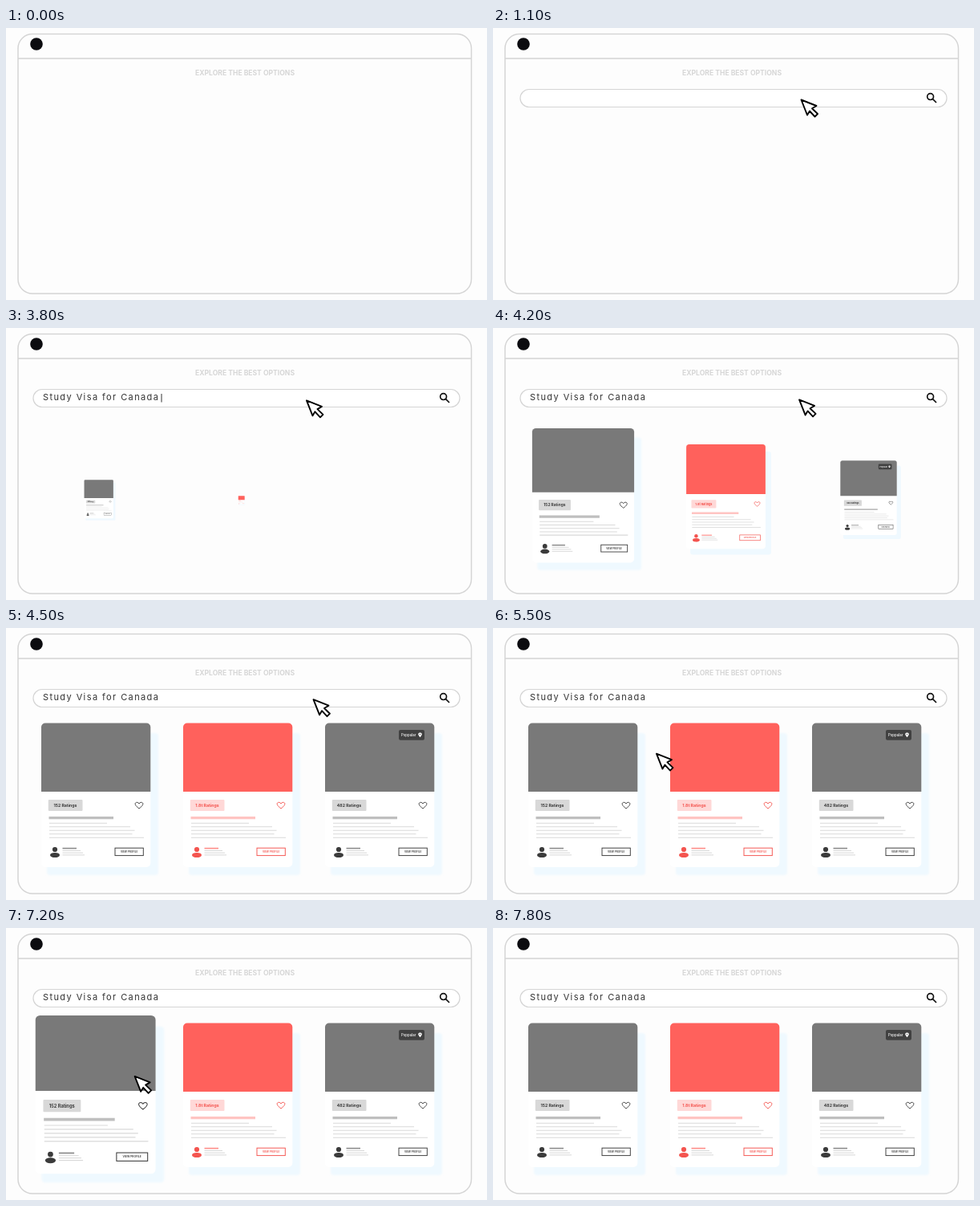
Recreate the animation shown at these times as an HTML page. Size 600 by 339 pixels, loop 9000 ms.

```html
<!DOCTYPE html>
<html lang="en">
<head>
<meta charset="utf-8">
<title>Study visa search</title>
<style>
  html, body { margin: 0; width: 100%; height: 100%; overflow: hidden; background: #fdfdfd; }
  svg { display: block; width: 100%; height: 100%; }
  text { font-family: Inter, "Open Sans", sans-serif; }
</style>
</head>
<body>
<svg viewBox="0 0 600 339">
  <defs>
    <filter id="soft" x="-10%" y="-10%" width="120%" height="120%">
      <feGaussianBlur stdDeviation="1"/>
    </filter>
  </defs>
  <rect width="600" height="339" fill="#fdfdfd"/>
  <g fill="none" stroke="#d5d5d5" stroke-width="1.5">
    <rect x="15" y="7.5" width="565.5" height="323.5" rx="18"/>
    <path d="M15 38H580.5"/>
  </g>
  <circle cx="38" cy="20" r="7.8" fill="#0b0b0f"/>
  <text x="298" y="58.6" text-anchor="middle" font-size="8.6" font-weight="700" fill="#d6d6d6">EXPLORE THE BEST OPTIONS</text>

  <g id="bar">
    <rect x="34" y="76.5" width="532" height="22" rx="11" fill="#fff" stroke="#d5d5d5" stroke-width="1.2"/>
    <g fill="none" stroke="#111" stroke-width="1.7">
      <circle cx="545.6" cy="85.6" r="3.9"/>
      <path d="M548.4 88.4L553 93"/>
    </g>
  </g>
  <text id="query" x="46" y="90.4" font-size="11" letter-spacing="1.4" fill="#333"></text>
  <path id="caret" d="M194 82V92.5" stroke="#333"/>

  <g id="cards"></g>
  <path id="cursor" d="M0 0L19 7.5L13.5 10.8L20.5 17.5L17 21L10.5 14L7.5 19Z"
        fill="#fff" stroke="#000" stroke-width="1.9" stroke-linejoin="round"/>
</svg>

<script>
const LOOP = 9000, STEP = 100;
const QUERY = "Study Visa for Canada";
const CENTER = { x: 117, y: 215 }, CARD_GAP = 177;
const GRAY = { top: "#797979", badge: "#d8d8d8", bar: "#bfbfbf", ink: "#3b3b3b", name: "#8c8c8c" };
const RED = { top: "#ff615c", badge: "#ffd8d7", bar: "#ffc4c2", ink: "#f4544f", name: "#ff8d89" };
const CARDS = [
  { ratings: "152 Ratings", colors: GRAY },
  { ratings: "1.8t Ratings", colors: RED },
  { ratings: "482 Ratings", colors: GRAY, popular: true }
];

const $ = id => document.getElementById(id);
const clamp = v => Math.min(1, Math.max(0, v));
const progress = (t, from, to) => clamp((t - from) / (to - from));
const ease = u => (1 - Math.cos(Math.PI * u)) / 2;
const mix = (a, b, u) => a + (b - a) * u;
const rule = (x1, x2, y, color, width) =>
  `<path d="M${x1} ${y}H${x2}" stroke="${color}" stroke-width="${width}"/>`;

const popularTag = `
  <rect x="136" y="127" width="32" height="12.8" rx="2" fill="#414141"/>
  <text x="139" y="135" font-size="4.3" font-weight="500" fill="#fff">Poppular</text>
  <path d="M162.5 136.3C158.6 132 160.6 130.6 162.5 130.6S166.4 132 162.5 136.3Z" fill="#fff"/>
  <circle cx="162.5" cy="132.6" r=".7" fill="#414141"/>`;

function cardMarkup({ ratings, colors: c, popular }) {
  const body = [126, 155, 160.5, 157.5, 172]
    .map((end, i) => rule(54, end, 243.2 + i * 4.5, "#d9d9d9", 1.1)).join("");
  const details = [94, 97, 99]
    .map((end, i) => rule(70.5, end - 1, 277.5 + i * 2.7, "#d4d4d4", .9)).join("");
  return `
    <rect x="51" y="131" width="139" height="177" rx="4" fill="#eff9ff" filter="url(#soft)"/>
    <rect x="44" y="118.5" width="136.3" height="179.5" rx="5" fill="#fff"/>
    <path d="M44 204V123.5a5 5 0 0 1 5-5H175.3a5 5 0 0 1 5 5V204Z" fill="${c.top}"/>
    ${popular ? popularTag : ""}
    <rect x="52.8" y="214" width="42.7" height="14" rx="1" fill="${c.badge}"/>
    <text x="74" y="223" text-anchor="middle" font-size="5.2" font-weight="700" fill="${c.ink}">${ratings}</text>
    <path d="M166 225C159 220 161 217.3 163.4 217.3Q165.2 217.3 166 219Q166.8 217.3 168.6 217.3C171 217.3 173 220 166 225Z"
          fill="none" stroke="${c.ink}" stroke-width=".95" stroke-linejoin="round"/>
    ${rule(53.5, 134, 236.6, c.bar, 3.4)}
    ${body}
    <g fill="${c.ink}">
      <circle cx="61" cy="276" r="3.1"/>
      <ellipse cx="61" cy="283" rx="6" ry="3.1"/>
    </g>
    ${rule(70.5, 88, 274.6, c.name, 1.6)}
    ${details}
    <rect x="136" y="274.2" width="35.3" height="9.4" fill="none" stroke="${c.ink}" stroke-width=".95"/>
    <text x="153.6" y="280" text-anchor="middle" font-size="3.05" font-weight="600" fill="${c.ink}">VIEW PROFILE</text>`;
}

$("cards").innerHTML = CARDS.map(card => `<g>${cardMarkup(card)}</g>`).join("");
const cardNodes = [...$("cards").children];

// Each leg eases from the previous point to [x, y] between two times.
const START = [660, 191];
const LEGS = [
  [0, 1100, 384.5, 89.5],
  [1100, 2600, 353, 93.2],
  [2600, 4460, 383.5, 89.2],
  [4660, 6000, 124.8, 186.3],
  [7050, 7950, 660, 165]
];

function cursorAt(t) {
  let [x, y] = START;
  for (const [from, to, nx, ny] of LEGS) {
    const u = ease(progress(t, from, to));
    x = mix(x, nx, u);
    y = mix(y, ny, u);
  }
  return `translate(${x} ${y})`;
}

function cardScale(t, i) {
  const pop = progress(t, 3640 + i * 125, 4240 + i * 125);
  if (i) return pop;
  const hover = ease(progress(t, 5500, 6000)) - ease(progress(t, 7050, 7550));
  return pop * (1 + .125 * hover);
}

function render(t) {
  $("bar").setAttribute("opacity", ease(progress(t, 150, 750)));
  $("query").textContent = QUERY.slice(0, Math.floor(clamp((t - 1900) / 1400) * QUERY.length + .01));
  $("caret").setAttribute("opacity", t >= 3400 && t < 4000 ? 1 : 0);
  cardNodes.forEach((node, i) => {
    const scale = cardScale(t, i);
    node.setAttribute("visibility", scale > 0 ? "visible" : "hidden");
    node.setAttribute("transform",
      `translate(${CENTER.x + i * CARD_GAP} ${CENTER.y}) scale(${scale}) translate(${-CENTER.x} ${-CENTER.y})`);
  });
  $("cursor").setAttribute("transform", cursorAt(t));
}

const begin = performance.now();
function tick() {
  const t = (performance.now() - begin) % LOOP;
  render(Math.floor(t / STEP) * STEP);
  requestAnimationFrame(tick);
}
tick();
</script>
</body>
</html>
```
